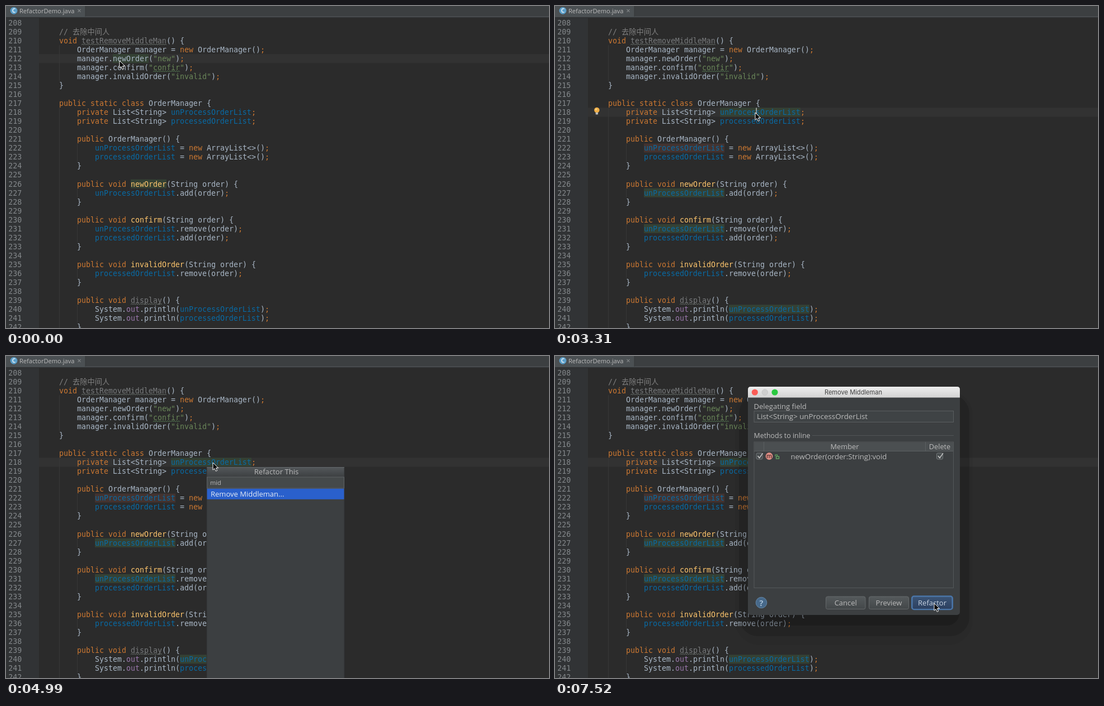
Recreate the animation shown at these times as an HTML page. Size 971 px wide and 577 px high, loop 8 s.

```html
<!DOCTYPE html>
<html lang="en">
<head>
<meta charset="utf-8">
<title>Refactoring demo</title>
<style>
html, body { margin: 0; width: 100%; height: 100%; overflow: hidden; background: #2b2b2b; }
svg { display: block; width: 971px; height: 577px; }
text { white-space: pre; }
.code { font: 13.288px "DejaVu Sans Mono", "Noto Sans CJK SC", "Noto Sans CJK", monospace; }
.ui { font-family: "Open Sans", "DejaVu Sans", sans-serif; }
</style>
</head>
<body>
<svg viewBox="0 0 971 577">
  <defs>
    <linearGradient id="menuTitle" x2="0" y2="1"><stop stop-color="#53575a"/><stop offset="1" stop-color="#3d4042"/></linearGradient>
    <linearGradient id="winTitle" x2="0" y2="1"><stop stop-color="#ededed"/><stop offset="1" stop-color="#d3d3d3"/></linearGradient>
    <linearGradient id="button" x2="0" y2="1"><stop stop-color="#555a5c"/><stop offset="1" stop-color="#434749"/></linearGradient>
    <linearGradient id="primary" x2="0" y2="1"><stop stop-color="#3b5475"/><stop offset="1" stop-color="#2c4060"/></linearGradient>
  </defs>
  <g id="back"></g><g id="marks"></g><g id="source"></g><g id="overlay"></g>
  <path id="pointer" d="M0 0V13.2L3 10.5L5.2 15.3L7.6 14.3L5.4 9.6H9.6Z" fill="#000" stroke="#fff" stroke-width="1"/>
</svg>
<script>
const LOOP = 8000, FIRST = 208, COL = 8, ROW = 16.04, LEFT = 63;
const SRC = `
    // 去除中间人
    void testRemoveMiddleMan() {
        OrderManager manager = new OrderManager();
        manager.newOrder("new");
        manager.confirm("confir");
        manager.invalidOrder("invalid");
    }

    public static class OrderManager {
        private List<String> unProcessOrderList;
        private List<String> processedOrderList;

        public OrderManager() {
            unProcessOrderList = new ArrayList<>();
            processedOrderList = new ArrayList<>();
        }

        public void newOrder(String order) {
            unProcessOrderList.add(order);
        }

        public void confirm(String order) {
            unProcessOrderList.remove(order);
            processedOrderList.add(order);
        }

        public void invalidOrder(String order) {
            processedOrderList.remove(order);
        }

        public void display() {
            System.out.println(unProcessOrderList);
            System.out.println(processedOrderList);
        }`.split("\n");

const $ = id => document.getElementById(id);
const esc = s => s.replace(/&/g, "&amp;").replace(/</g, "&lt;").replace(/>/g, "&gt;");
const rect = (x, y, w, h, fill, more = "") =>
  `<rect x="${x}" y="${y}" width="${w}" height="${h}" fill="${fill}" ${more}/>`;
const circle = (x, y, r, fill, more = "") =>
  `<circle cx="${x}" cy="${y}" r="${r}" fill="${fill}" ${more}/>`;
const path = (d, stroke, width = 1) =>
  `<path d="${d}" fill="none" stroke="${stroke}" stroke-width="${width}"/>`;
const label = (x, y, s, size = 13, fill = "#bbbbbb", anchor = "start", more = "") =>
  `<text class="ui" x="${x}" y="${y}" font-size="${size}" fill="${fill}" text-anchor="${anchor}" ${more}>${esc(s)}</text>`;
const mono = (x, y, s, fill, more = "") =>
  `<text class="code" x="${x}" y="${y}" fill="${fill}" ${more}>${esc(s)}</text>`;
const colX = c => LEFT + c * COL;
const rowY = i => 30 + i * ROW;

function tokenColor(word, before) {
  if (word.startsWith("//")) return "#808080";
  if (word[0] === '"') return "#6a8759";
  if (/^(void|public|static|class|private|new|;)$/.test(word)) return "#cc7832";
  if (/^(unProcess|processed)OrderList$/.test(word)) return "#086ba6";
  if (/^(testRemoveMiddleMan|display)$/.test(word)) return "#787a7c";
  if (word === "out") return "#9876aa";
  return before.endsWith("void ") ? "#ffc66d" : "#a9b7c6";
}

function wave(word, color) {
  const i = SRC.findIndex(s => s.includes(word + "(") || s.includes(`"${word}"`));
  const x0 = colX(SRC[i].indexOf(word + (word === "confir" ? '"' : "")));
  let d = `M${x0} ${rowY(i) + 7.6}`;
  for (let k = 0; k < word.length * 4; k++) d += `l2 ${k % 2 ? 1.6 : -1.6}`;
  return path(d, color, 0.8);
}

function drawSource() {
  let out = "";
  SRC.forEach((line, i) => {
    const y = rowY(i) + 4.8;
    out += mono(4.3, y, String(FIRST + i), "#84888b");
    for (const m of line.matchAll(/\/\/.*|"[^"]*"|\w+|;|[^\w\s";]+/g)) {
      const italic = m[0] === "out" ? 'font-style="italic"' : "";
      out += mono(colX(m.index), y, m[0], tokenColor(m[0], line.slice(0, m.index)), italic);
    }
  });
  return out + wave("testRemoveMiddleMan", "#78817a") + wave("confir", "#5d8a5b") + wave("display", "#78817a");
}

function drawBack() {
  return rect(0, 0, 971, 577, "#2b2b2b") + rect(0, 20, 59, 557, "#313335") +
    rect(0, 0, 971, 20, "#3c3f41") + rect(0, 0, 142, 19, "#4b5053") +
    rect(0, 18.5, 971, 1.5, "#4c5154") + rect(0, 20, 971, 1.5, "#2f3132") +
    rect(141.5, 0, 1, 19, "#343739") +
    circle(14, 8.3, 6.4, "#5b9fca") + label(14, 12, "C", 10, "#e9f2f8", "middle", 'font-weight="700"') +
    label(24, 12.8, "RefactorDemo.java", 11.1) +
    path("M128.5 5.8l5 5m0 -5l-5 5", "#84888a", 1.1);
}

function drawGuides() {
  const guide = (c, from, to) =>
    rect(colX(c), rowY(from - FIRST) - 8, 1, (to - from + 1) * ROW, "#373737");
  return [[4, 211, 214], [4, 218, 242], [8, 222, 223], [8, 227, 227], [8, 231, 232], [8, 236, 236], [8, 240, 241]]
    .map(g => guide(...g)).join("");
}

function drawMarks(s) {
  let out = rect(59, rowY(s.row - FIRST) - 8, 912, 16, "#323232") + drawGuides();
  SRC.forEach((line, i) => {
    const m = line.match(new RegExp("\\b" + s.word + "\\b"));
    if (!m) return;
    const write = line.startsWith(" =", m.index + s.word.length);
    out += rect(colX(m.index), rowY(i) - 8, s.word.length * COL, 16, write ? "#433330" : "#344134");
  });
  if (s.caret) out += rect(s.caret, rowY(s.row - FIRST) - 8, 1.4, 13, "#c8c8c8");
  if (s.bulb) out += circle(74.8, 186.6, 4.8, "#f0ae45") + circle(73.6, 185.2, 1.7, "#f8cf83") +
    rect(72.6, 190.8, 4.4, 3.8, "#b9bbbb", 'rx="1"');
  return out;
}

const MENU = [
  [227, "1. Rename...", "F2"], [248, "2. Move...", "F6"], [267, "3. Copy...", "F5"],
  [286, "4. Safe Delete...", "⌘⌦"], [322, "5. Delegate..."], [340.5, "6. Interface..."],
  [359, "7. Superclass..."], [378, "8. Subclass..."], [399, "9. Inline...", "⌥⌘N"],
  [420.5, "0. Pull Members Up..."], [439, "Push Members Down..."], [458, "Use Interface Where Possible..."],
  [476.8, "Replace Inheritance with Delegation..."], [495.5, "Remove Middleman..."],
  [517, "Encapsulate Fields..."], [535.5, "Replace Constructor with Builder..."],
  [557, "Generify..."], [578, "Remove Unused Resources..."]
];

function drawMenu(query) {
  const rule = (y, x1 = 360, x2 = 604) => path(`M${x1} ${y}H${x2}`, "#53575a");
  const item = (y, s, key, on) => (on ? rect(359.5, y - 9.5, 245, 19, "#2a60cc") : "") +
    label(366, y + 4.6, s, 13, on ? "#e6ecf5" : "#bbbbbb") +
    (key ? label(595.5, y + 4.6, key, 12.6, on ? "#c3d2ee" : "#bbbbbb", "end") : "");
  let out = rect(359, 199, 246, 390, "#3c3f41", 'stroke="#303234"') +
    rect(359.5, 199.5, 245, 17, "url(#menuTitle)") + path("M359 199.5H605", "#64686a") +
    label(483.5, 212.2, "Refactor This", 13.1, "#bbbbbb", "middle");
  if (!query) {
    out += [238, 389, 410, 506.5, 546.5, 567.5].map(y => rule(y)).join("") +
      rule(304, 360, 454) + rule(304, 508, 604) + label(481, 308.4, "Extract", 13, "#85898b", "middle");
    return out + MENU.map(([y, s, key], i) => item(y, s, key, i === 0)).join("");
  }
  const hits = query === "m" ? MENU.filter(m => /\bM/.test(m[1])) : [MENU[13]];
  out += rect(359.5, 217, 245, 20, "#45494a", 'stroke="#5f6365"') + label(365, 231, query, 11);
  return out + hits.map((m, i) => item(247.3 + i * 18.7, m[1], m[2], i === 0)).join("");
}

function drawButton(x, w, s, focus) {
  const ring = focus ? rect(x - .5, 430.3, w + 1, 24, "none", 'rx="4" stroke="#4874a8" stroke-width="2"') : "";
  return rect(x + .5, 431, w - 1, 22.6, focus ? "url(#primary)" : "url(#button)",
    `rx="3" stroke="${focus ? "#5a83b2" : "#64686a"}"`) + ring +
    label(x + w / 2, 447.2, s, 13, focus ? "#c9d4e2" : "#bbbbbb", "middle");
}

function drawCheck(x, y) {
  return rect(x - 5.5, y - 5, 11, 11, "#474c4e", 'rx="2" stroke="#74797b"') +
    path(`M${x - 3} ${y}l3 3.6l6 -8.5`, "#c4c4c4", 1.6);
}

function drawForm(focus) {
  return label(355.5, 94.5, "Delegating field") +
    rect(356, 98.5, 356.5, 20, "#3f4345", 'stroke="#5a5e60"') + label(361, 113.2, "List<String> unProcessOrderList", 13.3) +
    label(355.5, 146.5, "Methods to inline", 12.4) + path("M460 142.5H713", "#515557") +
    rect(356, 154, 356.5, 261.5, "#3c3f41", 'stroke="#54585a"') +
    rect(356.5, 154.5, 355.5, 15.5, "#4b4f51") + path("M356 170.5H712M373.5 154V170M662.5 154V170", "#5b5f61") +
    label(518, 166.6, "Member", 12.8, "#bbbbbb", "middle") + label(688, 166.6, "Delete", 12.7, "#bbbbbb", "middle") +
    drawCheck(365.5, 179) + drawCheck(688, 179) +
    circle(383, 179.5, 6.4, "#df8e85") + label(383, 183, "m", 10.5, "#4a2b2b", "middle", 'font-weight="600"') +
    rect(395.5, 180, 5, 4, "none", 'stroke="#64ae63" stroke-width="1.3"') +
    path("M394 179.5v-2.5h3.5v2.5", "#64ae63", 1.2) +
    label(421.5, 184.8, "newOrder(order:String):void", 13.15) +
    circle(369, 442, 9.8, "#47698a", 'stroke="#6286a6"') + label(369, 447.6, "?", 15, "#b9d0e4", "middle", 'font-weight="600"') +
    drawButton(484, 71.5, "Cancel") +
    drawButton(561, 72, "Preview", focus === "Preview") +
    drawButton(638.5, 72, "Refactor", focus === "Refactor");
}

function drawDialog(focus) {
  const shade = (x, y, w, h, r, a) => rect(x, y, w, h, "#000", `rx="${r}" fill-opacity="${a}"`);
  return shade(322, 62, 425, 456, 44, .05) + shade(329, 69, 412, 433, 34, .15) + shade(345, 90, 378, 393, 22, .18) +
    rect(345, 55, 379, 409, "#3c3f41", 'rx="5"') +
    `<path d="M345 74.5V60q0 -5 5 -5H719q5 0 5 5V74.5Z" fill="url(#winTitle)"/>` +
    circle(357.3, 65, 5.6, "#fb5d57") + circle(375.3, 65, 5.3, "#cfcfcf", 'stroke="#bdbdbd" stroke-width=".6"') +
    circle(393, 65, 5.6, "#2ac940") +
    `<text x="533.5" y="69" text-anchor="middle" font-family="Inter, sans-serif" font-size="11.1" fill="#404040">Remove Middleman</text>` +
    (focus ? drawForm(focus) : "");
}

// time, x, y of the pointer tip; it jumps from one to the next
const MOVES = [
  [0, 203, 98], [300, 202, 98], [620, 204, 101], [770, 222, 118], [920, 262, 152], [1070, 308, 190],
  [1220, 340, 214], [1370, 350, 219], [1520, 351, 209], [1670, 352, 207], [1820, 358, 191],
  [3790, 364, 191], [3940, 370, 191], [6340, 377, 199], [6490, 418, 238], [6640, 492, 303],
  [6790, 580, 372], [6940, 655, 421], [7090, 688, 440], [7220, 678, 443]
];

function stateAt(t) {
  const within = (a, b) => t >= a && t < b;
  return {
    row: t < 1670 ? 212 : t < 1820 ? 219 : 218,
    word: t < 1670 ? "newOrder" : t < 2270 ? "processedOrderList" : "unProcessOrderList",
    caret: within(1670, 1820) ? 352 : within(1820, 2710) || within(3310, 3610) ? 359.4 : 0,
    bulb: within(2860, 3610),
    menu: within(3610, 5590),
    query: t < 4540 ? "" : t < 4690 ? "m" : t < 4990 ? "mi" : "mid",
    dialog: t >= 5590,
    focus: t < 5740 ? "" : t < 7520 ? "Preview" : "Refactor"
  };
}

let shown = "";
function render(t) {
  const s = stateAt(t), key = JSON.stringify(s);
  if (key !== shown) {
    shown = key;
    $("marks").innerHTML = drawMarks(s);
    $("overlay").innerHTML = s.menu ? drawMenu(s.query) : s.dialog ? drawDialog(s.focus) : "";
  }
  const [, x, y] = MOVES.findLast(m => m[0] <= t);
  $("pointer").setAttribute("transform", `translate(${x} ${y})`);
}

$("back").innerHTML = drawBack();
$("source").innerHTML = drawSource();
const start = performance.now();
function tick() {
  render((performance.now() - start) % LOOP);
  requestAnimationFrame(tick);
}
tick();
</script>
</body>
</html>
```
